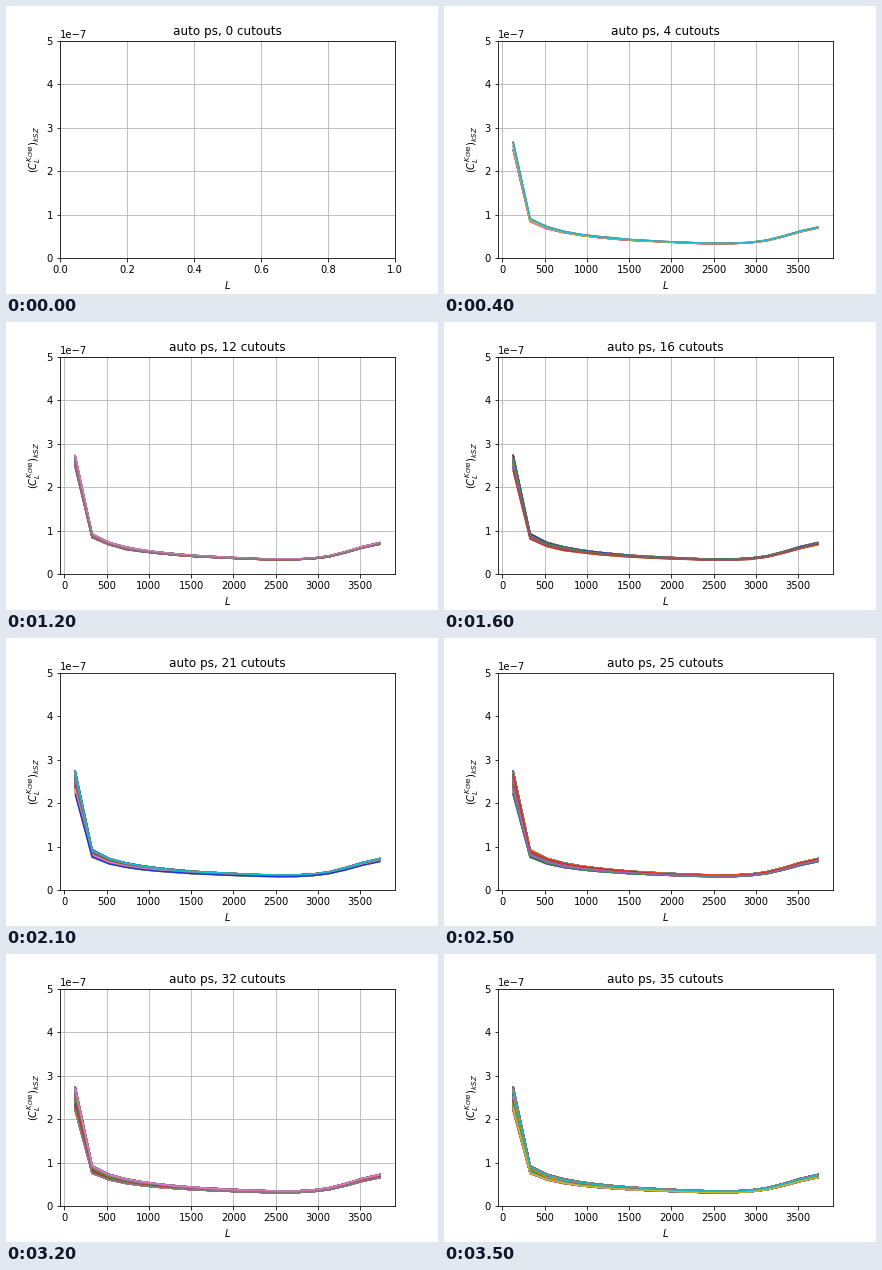
Write a matplotlib script that moves like this. It is 432 by 288 pixels and loops after 3600 ms.

```python
import numpy as np
import matplotlib.pyplot as plt
from matplotlib.animation import FuncAnimation
from matplotlib.collections import LineCollection

FRAMES = 36
STEP_MS = 100
NARROW = 12  # the first spectra all lie in the upper half of the band
COLORS = ["#1f2fe0"] + [f"C{i}" for i in range(1, 10)]

ell = 129 + 200 * np.arange(19)


def mean_spectrum(l):
    power = 0.492 * (l / 1000) ** -0.47
    spike = 1.17 * np.exp(-(l - l[0]) / 40)
    rise = 0.51 / (1 + np.exp((3405 - l) / 210))
    return power + spike + rise


def make_spectra(count):
    rng = np.random.default_rng(5)
    k = np.arange(1, count + 1)
    level = -np.cos(2.86 * (k - 21))
    level = np.where(k <= NARROW, 0.55 + 0.45 * level, level)
    jitter = rng.normal(0, 0.12, (count, ell.size))
    shape = np.clip(level[:, None] + jitter, -1, 1)
    spread = 0.045 + 0.07 * np.exp(-ell / 1500)
    return 1e-7 * mean_spectrum(ell) * (1 + spread * shape)


curves = [np.column_stack([ell, y]) for y in make_spectra(FRAMES - 1)]
margin = 0.05 * np.ptp(ell)
data_range = ell[0] - margin, ell[-1] + margin

fig, ax = plt.subplots(figsize=(6, 4), dpi=72)
fig.subplots_adjust(left=0.125, right=0.9, bottom=0.125, top=0.88)
ax.set_ylim(0, 5e-7)
ax.set_xlabel("$L$")
ax.set_ylabel(r"$(C_L^{K_{CMB}})_{kSZ}$")
title = ax.set_title("")
lines = LineCollection([], linewidths=1.5, zorder=2, capstyle="projecting",
                       joinstyle="round")
ax.add_collection(lines, autolim=False)


def update(n):
    # every step overplots all spectra so far and continues the colour cycle
    stack = [curves[j] for k in range(1, n + 1) for j in range(k)]
    lines.set_segments(stack)
    lines.set_color(COLORS)
    ax.set_xlim(data_range if n else (0, 1))
    ax.grid(n % 2 == 0)
    title.set_text(f"auto ps, {n} cutouts")
    return lines, title


anim = FuncAnimation(fig, update, frames=FRAMES, interval=STEP_MS,
                     repeat=True, repeat_delay=0, blit=False)
plt.show()
```
